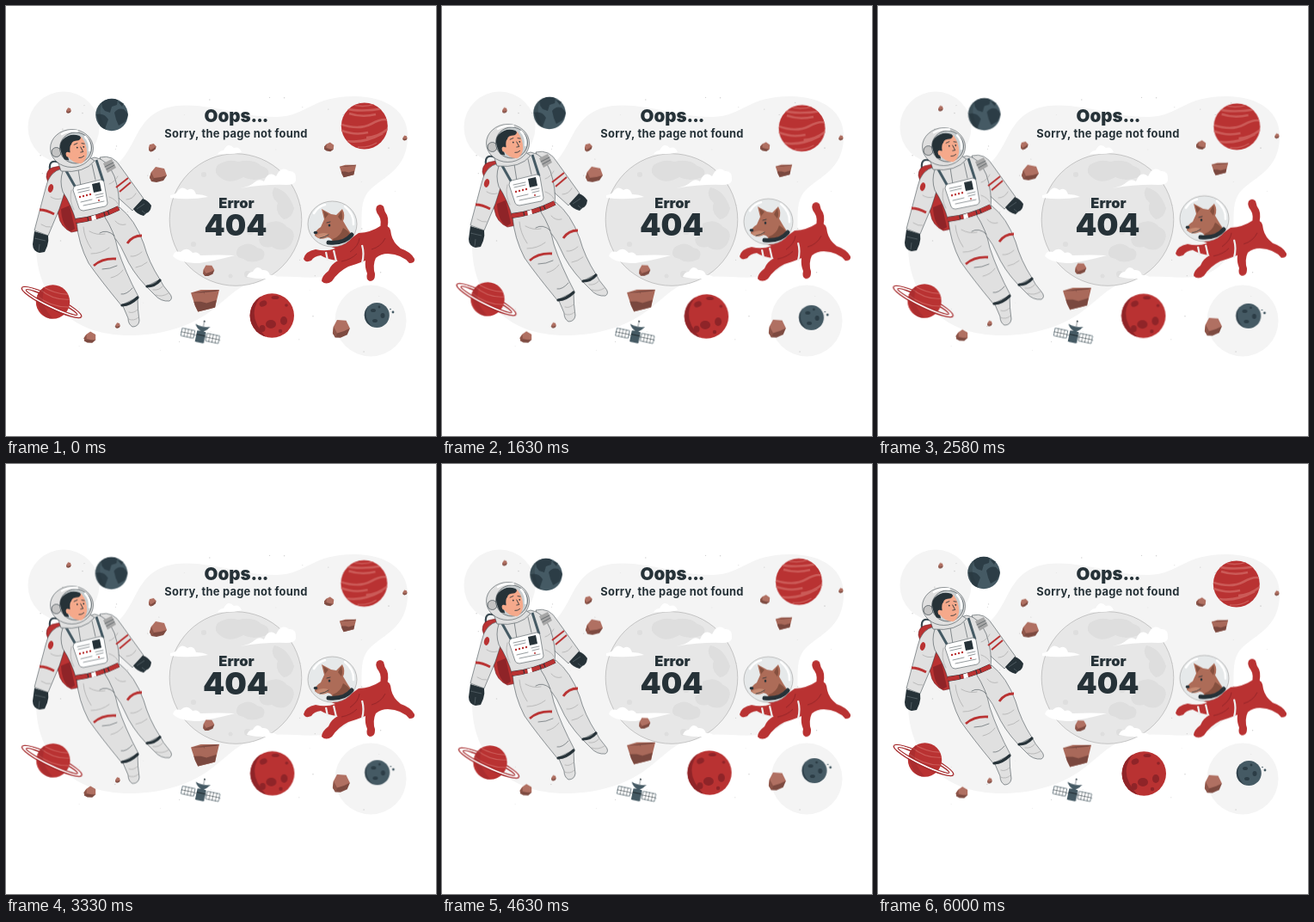
An HTML page for the animation above (6.04 s loop, 500 by 500 pixels).

```html
<!DOCTYPE html>
<html lang="en">
<head>
<meta charset="utf-8">
<title>Page not found</title>
<style>
  html, body { margin: 0; width: 100%; height: 100%; overflow: hidden; background: #fff; }
  svg { display: block; width: 100vw; height: 100vh; }
  text { font-family: Inter, "Open Sans", sans-serif; fill: #263238; text-anchor: middle; }

  .astronaut, .dog, .rocks, .planets, .satellite, .code { animation: 6040ms linear infinite; }
  .astronaut { animation-name: float; }
  .dog { animation-name: float-late; }
  .rocks { animation-name: float-slow; }
  .planets { animation-name: sway; transform-origin: 250px 250px; }
  .satellite { animation-name: shake; }
  .code { animation-name: beat; transform-origin: 267px 254.5px; }

  @keyframes float {
    0%, 49.669%, 99.338% { transform: translateY(0); }
    24.834%, 74.503% { transform: translateY(-6.67px); }
    100% { transform: translateY(-.18px); }
  }
  @keyframes float-late {
    0%, 16.556%, 66.225% { transform: translateY(0); }
    41.391%, 91.06% { transform: translateY(-6.67px); }
    100% { transform: translateY(-4.27px); }
  }
  @keyframes float-slow {
    0%, 24.834% { transform: translateY(0); }
    74.503% { transform: translateY(-6.67px); }
    100% { transform: translateY(-3.25px); }
  }
  @keyframes sway {
    0%, 99.338% { transform: rotate(0deg); }
    24.834% { transform: rotate(1deg); }
    74.503% { transform: rotate(-1deg); }
    100% { transform: rotate(.027deg); }
  }
  @keyframes shake {
    0%, 99.338%, 100% { transform: translateX(0); }
    9.934%, 89.404% { transform: translateX(-.67px); }
    19.868%, 79.47% { transform: translateX(1.33px); }
    29.801%, 49.669%, 69.536% { transform: translateX(-2.67px); }
    39.735%, 59.603% { transform: translateX(2.67px); }
  }
  @keyframes beat {
    0%, 29.801%, 39.735%, 59.603%, 100% { transform: scale(1); }
    9.934%, 49.669% { transform: scale(1.1); }
  }

  .red { fill: #b93232; }
  .deep { fill: #8f2428; }
  .dark { fill: #263238; }
  .slate { fill: #455a64; }
  .suit { fill: #e0e0e0; stroke: #263238; stroke-width: .5; stroke-linejoin: round; }
  .line { fill: none; stroke: #263238; stroke-width: .5; stroke-linecap: round; }
  .bold { stroke-width: .8; }
  .tube { fill: none; stroke: #37474f; stroke-width: 2.2; }
  .strap { fill: none; stroke: #455a64; stroke-width: 3; }
  .band { fill: none; stroke: #b93232; stroke-width: 2.8; }
  .thin { stroke-width: 2; }
  .cuff { fill: none; stroke: #263238; stroke-width: 3.2; stroke-linecap: round; }
  .fold { fill: none; stroke: #a9a9a9; stroke-width: .7; stroke-linecap: round; }
  .shine { fill: none; stroke: #fff; stroke-width: 2.5; stroke-linecap: round; }
  .white { fill: #fff; }
</style>
</head>
<body>
<svg viewBox="0 0 500 500">
  <defs>
    <clipPath id="moonClip"><circle cx="267" cy="248.500" r="76.500"/></clipPath>
    <clipPath id="earthClip"><circle cx="123" cy="126.500" r="18.700"/></clipPath>
    <clipPath id="stripeClip"><circle cx="416.800" cy="139.500" r="27"/></clipPath>
    <clipPath id="craterClip"><circle cx="309.300" cy="360" r="25.700"/></clipPath>
    <clipPath id="smallClip"><circle cx="431.300" cy="359.500" r="14.500"/></clipPath>
    <clipPath id="ringClip"><circle cx="54.500" cy="344" r="19.700"/></clipPath>
    <!-- Rocks drawn around their own centre, 20 units wide -->
    <g id="lump">
      <path fill="#b07062" d="M-8-3L-3-9 7-7 10 1 5 6-6 8-10 3Z"/>
      <path fill="#7d4a40" d="M-10 3L-5 4 3 3 10 1 6 7-2 9-8 8Z"/>
      <path fill="#8d5549" d="M-8-3L-5 4-7 8-10 4Z"/>
    </g>
    <g id="wedge">
      <path fill="#a9695a" d="M-10-5L-3-7 10-7 7 5 3 6-5 8-7 4Z"/>
      <path fill="#7a483f" d="M-8 1L-3 1 1 2 8 0 7 5 3 6-5 8-7 4Z"/>
      <path fill="#7a483f" d="M-10-5L-1-6 0-4-2-6 10-7 8-6-3-5Z"/>
    </g>
  </defs>

  <!-- Backdrop -->
  <g fill="#f4f4f4">
    <circle cx="67" cy="141" r="41.500"/>
    <circle cx="424" cy="366" r="41.500"/>
    <path d="M35 275C36 220 80 208 112 195C158 176 142 124 198 116C238 112 275 130 315 129C350 128 355 105 405 105C444 105 469 124 467 155C465 190 440 198 424 213C403 232 424 270 403 296C375 331 330 306 292 318C260 329 250 352 216 368C180 385 130 388 96 375C55 358 34 320 35 275Z"/>
  </g>
  <g id="stars" fill="#d2d2d2"></g>

  <!-- Moon -->
  <circle cx="267" cy="248.500" r="76.800" fill="#e7e7e7" stroke="#999" stroke-width=".5"/>
  <g clip-path="url(#moonClip)" fill="#dedede">
    <path d="M246 185Q258 177 270 181Q288 177 297 186Q310 190 303 199Q288 205 276 199Q260 208 250 200Q240 194 246 185ZM312 211Q328 214 335 235Q333 247 323 248Q312 240 316 229Q306 220 312 211ZM303 253Q318 246 327 257Q340 262 331 278Q322 288 309 280Q295 283 294 271Q304 266 303 253ZM270 281Q282 272 292 281Q304 283 299 294Q285 301 276 294Q264 292 270 281Z"/>
    <circle cx="320" cy="187" r="4"/><circle cx="281" cy="312" r="4"/>
    <circle cx="261" cy="314" r="2.500"/><circle cx="284" cy="262" r="4"/>
    <circle cx="218" cy="277" r="3"/><circle cx="230" cy="196" r="3"/>
  </g>
  <g class="white">
    <path d="M191 220Q197 219 199 216Q204 208 211 214Q218 210 221 219Q229 219 235 222Q214 226 191 223Z"/>
    <path d="M272 212Q284 210 289 205Q294 200 300 204Q305 191 314 198Q320 185 329 192Q338 191 337 203Q336 208 326 208Q302 207 272 212Z"/>
    <path d="M194 291Q196 284 203 286Q210 279 217 287Q223 285 226 290Q248 289 266 290Q244 296 225 299Q202 299 194 291Z"/>
    <path d="M280 315Q282 309 287 309Q292 300 298 307Q305 306 307 313Q313 312 316 316Q298 319 280 315Z"/>
    <path d="M246 172Q249 168 253 168Q258 158 265 165Q271 163 274 170Q264 173 246 172Z"/>
  </g>

  <!-- Planets -->
  <g class="planets">
    <circle class="slate" cx="123" cy="126.500" r="18.700"/>
    <g clip-path="url(#earthClip)">
      <path fill="#2c3d46" d="M111 112Q120 105 130 109L129 115 123 117 121 124 115 122 112 118ZM105 126Q114 124 119 132L115 143 110 142ZM126 124Q130 118 137 120L143 126 138 135 131 139 128 132ZM130 111L137 113 135 117Z"/>
      <path d="M116 106Q102 124 119 146Q104 146 103 128Q103 112 116 106Z" fill="#263238" opacity=".28"/>
    </g>

    <circle class="red" cx="416.800" cy="139.500" r="27"/>
    <g clip-path="url(#stripeClip)" fill="none" stroke="#cb5a57" stroke-width="2.600">
      <path d="M394 119Q411 124 440 119M399 125Q414 130 430 126M388 137Q410 145 425 137T446 134M388 144Q405 151 421 147M397 157Q416 160 438 148M419 153Q431 153 444 143"/>
      <path d="M401 114Q414 119 429 114M409 164Q421 165 431 159" stroke-width="1.300"/>
    </g>

    <g transform="rotate(26 53 344.500)" fill="none">
      <path d="M14.500 344.500A38.500 7 0 0 1 91.500 344.500" stroke="#a62c2e" stroke-width="1.500"/>
      <path d="M16.500 344.500A36.500 5.400 0 0 1 89.500 344.500" stroke="#fff" stroke-width="1.800"/>
      <path d="M20 344.500A33 4 0 0 1 86 344.500" stroke="#a62c2e" stroke-width="1.400"/>
    </g>
    <circle class="red" cx="54.500" cy="344" r="19.700"/>
    <g clip-path="url(#ringClip)" fill="none" stroke="#cb5a57" stroke-width="1.100">
      <path d="M39 329Q55 343 75 341M42 326Q59 336 73 335M36 337Q53 351 75 350"/>
      <path d="M43 326Q33 346 52 365" stroke="#8f2428" stroke-width="6" opacity=".35"/>
    </g>
    <g transform="rotate(26 53 344.500)" fill="none">
      <path d="M20 344.500A33 4 0 0 0 86 344.500" stroke="#a62c2e" stroke-width="1.400"/>
      <path d="M16.500 344.500A36.500 5.400 0 0 0 89.500 344.500" stroke="#fff" stroke-width="1.800"/>
      <path d="M14.500 344.500A38.500 7 0 0 0 91.500 344.500" stroke="#a62c2e" stroke-width="1.500"/>
    </g>

    <circle class="red" cx="309.300" cy="360" r="25.700"/>
    <g clip-path="url(#craterClip)" class="deep">
      <path d="M300 334Q275 358 305 388L281 388 278 350Z"/>
      <ellipse cx="299" cy="346" rx="4.500" ry="3.400" transform="rotate(-25 299 346)"/>
      <ellipse cx="308" cy="370" rx="6" ry="5"/>
      <ellipse cx="323" cy="366" rx="4" ry="5"/>
      <ellipse cx="313" cy="339" rx="4.500" ry="2"/>
      <ellipse cx="298" cy="375" rx="3.500" ry="4"/>
      <circle cx="326" cy="348" r="1.800"/><circle cx="319" cy="378" r="2.200"/>
    </g>

    <circle class="slate" cx="431.300" cy="359.500" r="14.500"/>
    <g clip-path="url(#smallClip)" fill="#2c3d46">
      <path d="M424 345Q412 360 427 374L415 373 414 348Z" opacity=".8"/>
      <ellipse cx="427" cy="354" rx="3" ry="2"/><ellipse cx="438" cy="360" rx="2.500" ry="3"/>
      <ellipse cx="429" cy="366" rx="3" ry="2"/><circle cx="434" cy="350" r="1.400"/>
    </g>
    <circle class="slate" cx="450" cy="356" r="1.400"/><circle class="slate" cx="447" cy="352.500" r=".8"/>
  </g>

  <!-- Rocks -->
  <g class="rocks">
    <use href="#lump" transform="translate(73 121.500) scale(.28 .35)"/>
    <use href="#lump" transform="translate(170 164.500) rotate(-25) scale(.48)"/>
    <use href="#lump" transform="translate(177 196)"/>
    <use href="#lump" transform="translate(376 164) rotate(25) scale(.55 .6)"/>
    <use href="#wedge" transform="translate(397.500 191.500) scale(.97)"/>
    <use href="#lump" transform="translate(464 153.500) scale(.26 .32)"/>
    <use href="#lump" transform="translate(235.500 307.500) rotate(-10) scale(.68 .72)"/>
    <use href="#wedge" transform="translate(231.500 342) scale(1.650 1.700)"/>
    <use href="#lump" transform="translate(98 385.500) rotate(18) scale(.68 .75)"/>
    <use href="#lump" transform="translate(130 371.500) scale(.28 .35)"/>
    <use href="#lump" transform="translate(389.500 375) rotate(-8) scale(1.030 1.180)"/>
  </g>

  <!-- Satellite -->
  <g class="satellite">
    <g transform="rotate(12 226 384)">
      <path class="line" d="M203 384H249M227 366V372"/>
      <path d="M203.500 379h15v9h-15zM233 379h15v9h-15z" class="white" stroke="#455a64" stroke-width=".7"/>
      <path d="M207.300 379v9M211 379v9M214.800 379v9M203.500 383.500h15M236.800 379v9M240.500 379v9M244.300 379v9M233 383.500h15" class="line"/>
      <path class="slate" d="M217.500 371Q226 374 235 371Q232 376 228.500 378H225Q220 376 217.500 371Z"/>
      <rect class="slate" x="221" y="378" width="10.500" height="13.500" rx="1"/>
      <path class="dark" d="M221 382h10.500v1.200h-10.500z"/>
      <circle class="dark" cx="227" cy="366" r=".9"/>
    </g>
  </g>

  <!-- Astronaut -->
  <g class="astronaut">
    <path class="tube" d="M66 184Q49 175 51 191M127 211Q136 213 131 222Q127 228 122 224"/>
    <path class="red" stroke="#6f1e22" stroke-width=".6" d="M47 199Q47 188 58 187L79 183 91 260 76 263Q63 257 61 243Z"/>
    <path class="deep" d="M64 236L74 232 80 259 75 262Q65 256 64 236Z"/>

    <path class="suit" d="M109 248L132 234Q150 248 160 276Q166 298 179 318L163 326Q146 308 138 289Q129 268 117 263Z"/>
    <path class="suit" d="M82 251L114 244Q126 262 130 283Q138 308 154 338L134 348Q110 319 96 299Q84 276 82 251Z"/>
    <path class="band" d="M141 276Q147 267 158 267"/>
    <path class="band" d="M102 302Q112 293 128 294"/>
    <path class="fold" d="M99 288Q111 288 120 281M97 262Q106 267 115 265M122 316Q131 314 136 307M145 291Q151 292 158 286M127 250Q132 256 139 254M151 304Q158 303 164 298M90 257Q91 270 99 282"/>
    <path class="line" d="M109 264Q117 259 126 267M112 306Q121 306 129 302M134 335Q140 336 147 328"/>
    <path class="suit" d="M136 349L153 339Q153 353 155 366Q154 373 147 373Q142 370 142 363Z"/>
    <path class="suit" d="M164 327L179 318Q182 325 190 334Q195 340 190 343Q180 344 173 336Z"/>
    <path class="fold" d="M142 364Q149 367 154 362M143 356Q148 358 153 353M174 336Q181 339 189 334M171 330Q178 331 182 326"/>
    <path class="cuff" d="M135 348Q145 347 153 339M164 326Q173 326 179 319"/>

    <path class="suit" d="M66 189Q50 192 46 212L33 261 49 267 62 236 70 211Z"/>
    <path class="suit" d="M109 176Q125 172 134 188L160 224 147 238 123 216Z"/>
    <path class="suit" d="M66 192Q79 183 103 176Q118 178 126 198Q133 219 131 237L82 252Q76 231 66 216Q62 204 66 192Z"/>
    <path class="band" d="M39 237Q47 237 56 242"/>
    <path class="band thin" d="M128 211L142 200M132 216L145 205"/>
    <path class="fold" d="M52 222Q58 226 64 224M41 254Q47 258 52 257M140 225Q147 225 151 218M120 207Q126 205 130 198M76 214Q73 226 79 237M120 222Q128 225 130 230"/>
    <ellipse class="red" cx="52" cy="212" rx="3" ry="5" transform="rotate(15 52 212)"/>
    <path fill="#a6a6a6" d="M113 183L123 178 128 188 118 194Z"/>
    <path class="line" d="M115 187L125 182M117 190L126 185M84 190L87 209M100 184L104 202"/>
    <path class="strap" d="M69 190L82 213M105 179L113 204"/>
    <path class="suit" style="fill:#fff" d="M81 209L110 202Q113 202 114 205L118 229Q118 232 115 233L90 238Q86 238 85 235L78 214Q78 210 81 209Z"/>
    <path class="dark" d="M100 207L109 205 111 215 102 217Z"/>
    <path class="line" d="M83 214L97 211M84 217L97 214M90 232L114 227M104 220L113 218M105 223L113 221M87 228L100 225"/>
    <g class="red"><circle cx="86" cy="222" r="1.200"/><circle cx="90" cy="221" r="1.200"/><circle cx="94" cy="220" r="1.200"/><circle cx="98" cy="219" r="1.200"/><circle cx="108" cy="226" r="1"/></g>
    <path d="M81 250Q107 247 131 235" fill="none" stroke="#263238" stroke-width="5.800"/>
    <path d="M81 250Q107 247 131 235" fill="none" stroke="#b93232" stroke-width="5" stroke-dasharray="14 1 4 1"/>
    <path class="white" d="M99 244.500L104 243 105 248 100 249.500Z"/>

    <path class="dark" d="M33 262L49 267Q50 273 48 279L45 286 39 287Q31 285 31 277ZM148 236L159 224Q165 226 169 232Q168 240 163 241L160 244Q152 242 148 236Z"/>
    <path d="M33 270L46 273M39 277L38 285M152 236L161 230M158 238L163 242" fill="none" stroke="#5f6c72" stroke-width=".7"/>

    <path class="suit" d="M60 180Q78 194 97 176L103 180Q91 195 64 192Z"/>
    <ellipse class="suit" cx="76.500" cy="165.500" rx="25" ry="22"/>
    <circle cx="58.500" cy="170" r="5.500" fill="#c4c4c4" stroke="#263238" stroke-width=".6"/>
    <ellipse cx="81" cy="165" rx="18.500" ry="18" fill="#c9ced0" stroke="#263238" stroke-width=".6"/>
    <g transform="rotate(-10 81 166)">
      <path fill="#f5a98b" d="M70 165L72 155Q81 149 90 154Q95 163 93 174Q90 183 84 184Q74 182 70 172Z"/>
      <path class="dark" d="M66 176Q60 159 68 153Q78 146 88 152Q91 155 86 157Q78 156 77 160Q74 162 74 169L70 169 71 178Z"/>
      <ellipse cx="71" cy="171" rx="2.400" ry="3" fill="#f5a98b"/>
      <path class="line bold" d="M80 161L84 160M89 161L92 162M87 165L89 171 86 171M83 177Q86 178 89 176"/>
      <circle class="dark" cx="83" cy="165" r=".9"/><circle class="dark" cx="90.500" cy="165.500" r=".9"/>
    </g>
    <path class="shine" d="M92 152Q98 158 97 168M65 149Q73 144 83 145.500"/>
  </g>

  <!-- Dog -->
  <g class="dog">
    <path class="red" d="M434 262Q438 250 433 243Q429 238 431 233Q435 229 439 233Q440 239 443 243Q446 250 442 263Z"/>
    <path class="deep" d="M424 285Q428 294 424 301Q428 307 429 312L425 318Q418 309 419 297Z"/>
    <path class="red" d="M376 279Q395 276 410 264Q425 263 435 256Q447 252 448 266Q450 275 459 282Q471 286 475 294Q476 299 469 299Q461 289 444 288Q436 288 430 293Q426 301 429 313Q429 320 423 320Q418 318 420 311Q417 304 418 296Q408 300 398 303Q386 309 379 320Q372 325 367 320Q367 314 375 308Q378 300 386 296Q374 295 366 290Q358 291 355 296Q348 299 346 294Q348 285 360 283Q372 286 383 282Z"/>
    <path d="M372 286L374 296M381 284L384 297M414 278Q417 288 414 299" fill="none" stroke="#eee" stroke-width="2.200"/>
    <path d="M400 286Q410 279 411 270M425 283Q436 280 441 270M390 297Q401 295 408 288" fill="none" stroke="#8f2428" stroke-width=".8"/>
    <ellipse cx="379.500" cy="253.500" rx="28.500" ry="26.500" fill="#e6e9ea" stroke="#9b9b9b" stroke-width=".6"/>
    <path fill="#ad6c58" d="M370 248L367 236 378 242 384 243 391 236Q395 243 392 250Q397 259 402 266L380 276Q380 270 374 269Q365 273 359 267Q359 261 366 257Z"/>
    <path fill="#85503f" d="M369 238L375 242 371 247ZM390 238Q392 245 390 250L386 245ZM380 271Q389 268 392 258Q399 262 401 267L381 276Z"/>
    <path fill="#c58a72" d="M360 267Q367 262 375 265L373 269Q365 273 360 267Z"/>
    <ellipse class="dark" cx="360" cy="263.500" rx="2.300" ry="1.800"/>
    <ellipse class="dark" cx="376" cy="255" rx="1.300" ry="1.600"/>
    <path class="line bold" d="M373 252L377 251M365 270Q371 269 375 266"/>
    <path d="M375 275Q393 277 402 266" fill="none" stroke="#263238" stroke-width="5" stroke-linecap="round"/>
    <path class="shine" d="M394 233Q405 242 404 254M358 241Q363 233 371 231"/>
  </g>

  <!-- Words -->
  <text x="267.500" y="135.300" font-size="20.500" font-weight="900">Oops<tspan letter-spacing="-1">...</tspan></text>
  <text x="267.500" y="153" font-size="12.900" font-weight="700" letter-spacing=".25">Sorry, the page not found</text>
  <text x="268" y="234.500" font-size="16.500" font-weight="900">Error</text>
  <text class="code" x="267" y="267" font-size="34.500" font-weight="900">404</text>
</svg>
<script>
  // Faint, fixed specks of dust scattered from a seed
  let seed = 17;
  const rand = () => (seed = (seed * 16807) % 2147483647) / 2147483647;
  let dust = "";
  for (let i = 0; i < 70; i++) {
    const x = 40 + rand() * 420, y = 103 + rand() * 300, r = .35 + rand() * .5;
    dust += `<circle cx="${x.toFixed(1)}" cy="${y.toFixed(1)}" r="${r.toFixed(2)}"/>`;
  }
  document.getElementById("stars").innerHTML = dust;
</script>
</body>
</html>
```
